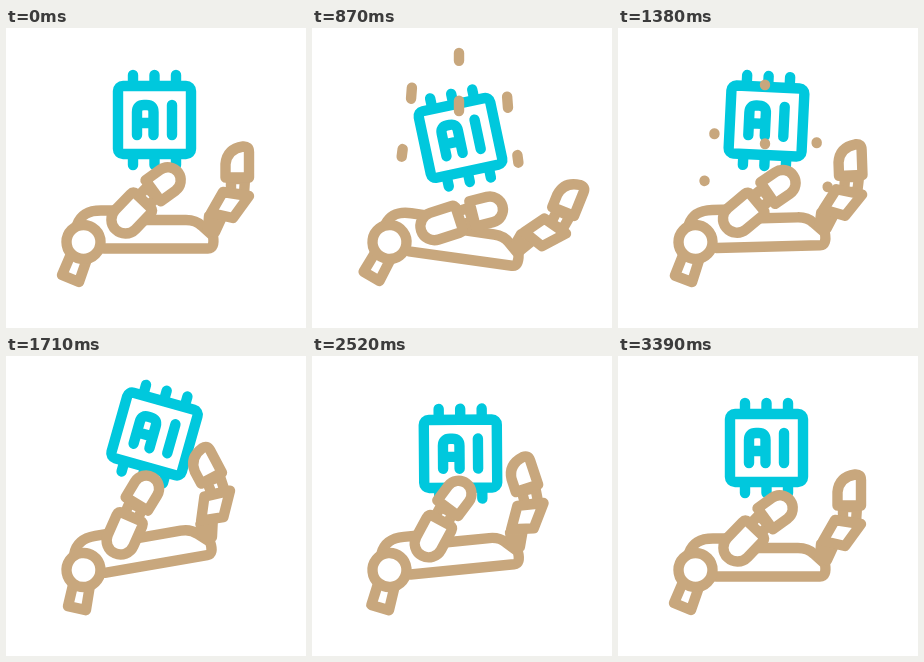
Write an HTML page that moves like this. It is 300 px wide and 300 px high and loops after 3.6 s.

```html
<!DOCTYPE html>
<html lang="en">
<head>
<meta charset="utf-8">
<title>AI chip held by a robot hand</title>
<style>
  html, body { margin: 0; width: 100%; height: 100%; overflow: hidden; background: #fff; }
  svg { display: block; width: 100%; height: 100%; fill: #fff; stroke-width: 10.4; stroke-linecap: round; stroke-linejoin: round; }
  .tan { stroke: #c8a77d; }
  .cyan { stroke: #00c8dd; }
  .line { fill: none; }
</style>
</head>
<body>
<svg viewBox="0 0 300 300">
  <g id="chip" class="cyan">
    <path id="pins"/>
    <rect x="-36.500" y="-34" width="73" height="68" rx="5"/>
    <path class="line" d="M-17.500 15V-8q0-7 7-7h2.500q7 0 7 7V15M-17 3H-1M17.500-15V15"/>
  </g>
  <g id="arm" class="tan">
    <path d="M65 226L56 247L73 254L82 228Z"/>
    <path class="line" d="M71 197C75 186 83 182.500 95 182.500H115M135 192H180Q190 192 196 198L207 208Q209 220.500 202 220.500H98"/>
    <circle cx="77.500" cy="214" r="17"/>
    <g id="finger">
      <path d="M203 188L215 191L209 204L202 202Z"/>
      <path d="M225 151H239L238 166H225Z"/>
      <path d="M217 164L243 168L227 190L205 185Z"/>
      <path id="fingertip" d="M219.500 149.500V136Q221 121 237 118.500Q243 118 243 124V149.500Z"/>
    </g>
    <g id="thumb">
      <path d="M27-7H40V7H27Z"/>
      <path d="M24-14H2a14 14 0 0 0 0 28H24q4 0 4-4V-10q0-4-4-4Z"/>
      <path id="thumbtip" d="M0-13H18a13 13 0 0 1 0 26H0Z"/>
    </g>
  </g>
  <path id="sparks" class="tan"/>
</svg>
<script>
const DURATION = 3600, STEP = 30, LAST = 3390;
const CHIP_BEATS = [0, 900, 1860, 2760, LAST];
const HAND_BEATS = [0, 720, 900, 1860, 3200];
const SPARKS = [  // x, y, fall
  [147, 15, 42], [147, 59, 57],
  [101, 45, 61], [194, 54, 61],
  [92, 111, 42], [204, 117, 42]
];

const part = id => document.getElementById(id);
const place = (id, transform) => part(id).setAttribute('transform', transform);

// Sine-eased progress from 0 to 1 between two times.
function ease(t, from, to) {
  const p = Math.min(1, Math.max(0, (t - from) / (to - from)));
  return (1 - Math.cos(Math.PI * p)) / 2;
}

// Starts at 0 and eases to each value by its beat.
const follow = (t, beats, values) => values.reduce(
  (v, next, i) => v + (next - v) * ease(t, beats[i], beats[i + 1]), 0);

// The hand opens, waits, closes and returns to rest.
const bend = (t, open, closed) => follow(t, HAND_BEATS, [open, open, closed, 0]);

function drawChip(t) {
  const y = 92 + follow(t, CHIP_BEATS, [18, -16, 10, 0]);
  const turn = follow(t, CHIP_BEATS, [-12, 17.5, -4, 0]);
  place('chip', `translate(148.5 ${y}) rotate(${turn})`);
}

function drawHand(t) {
  const fingerTime = t - 60, thumbTime = t - 100;
  place('arm', `rotate(${bend(t, 8, -11)} 77.5 214)`);
  place('finger', `rotate(${bend(fingerTime, 18, -16)} 206 200)`);
  place('fingertip', `rotate(${bend(fingerTime, -4, -6)} 231.5 156)`);
  place('thumb', `translate(118 193) rotate(${bend(thumbTime, 20, -16) - 46})`);
  place('thumbtip', `translate(42 0) rotate(${10 + bend(thumbTime, -6, -2)})`);
}

function drawSparks(t) {
  const tail = ease(t, 600, 1430), head = ease(t, 600, 1200);
  const lines = SPARKS.map(([x, y, fall]) => {
    const point = k => `${x + (x - 147) * 0.1 * k} ${y + fall * k}`;
    return `M${point(tail)}L${point(head)}`;
  });
  part('sparks').setAttribute('d', t > 600 && t < 1410 ? lines.join('') : '');
}

function tick() {
  const now = performance.now() % DURATION;
  const t = Math.min(Math.floor(now / STEP) * STEP, LAST);
  drawChip(t);
  drawHand(t);
  drawSparks(t);
  requestAnimationFrame(tick);
}

part('pins').setAttribute('d', [-21.5, 0, 21.5].map(x => `M${x}-45V45`).join(''));
tick();
</script>
</body>
</html>
```
